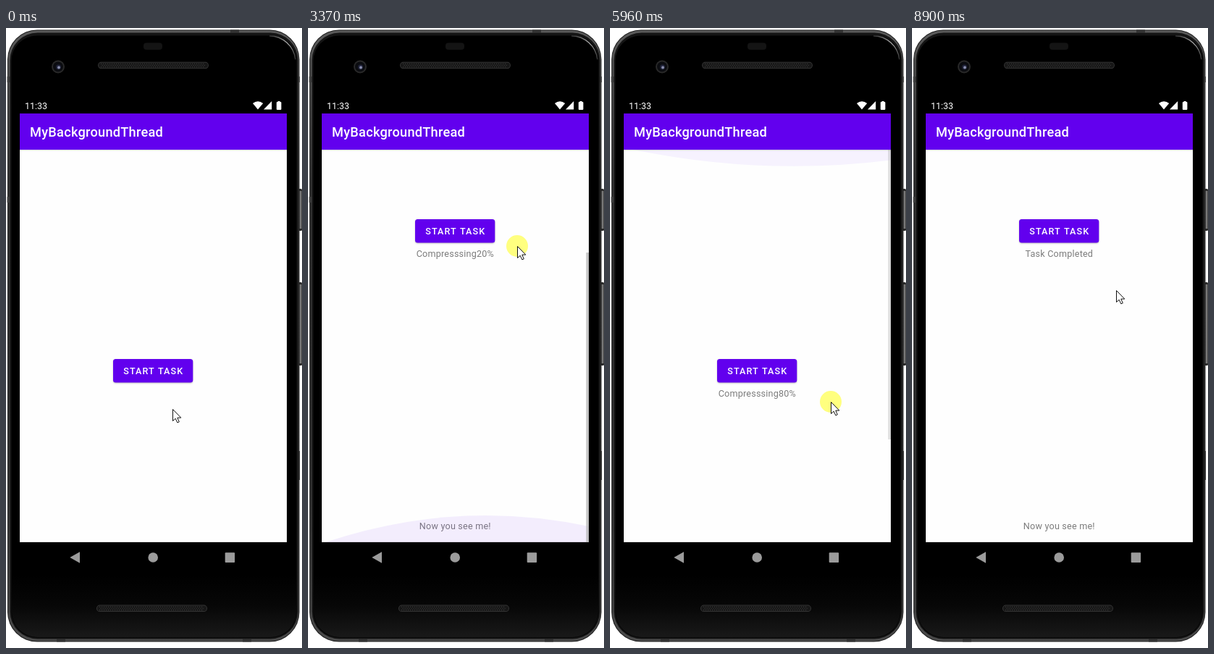
Animation of 409x856 px, one loop 9.07 s. Source, as an HTML page with a canvas:

```html
<!DOCTYPE html>
<html lang="en">
<head>
<meta charset="utf-8">
<title>Background task</title>
<style>
html, body { margin: 0; width: 100%; height: 100%; overflow: hidden; background: #fff; }
canvas { display: block; width: 409px; height: 856px; }
</style>
</head>
<body>
<canvas id="stage"></canvas>
<script>
const W = 409, H = 856, LOOP = 9070;
const STEP = 77, PHASE = 48;
const FONT = 'Roboto, "Noto Sans", sans-serif';
const PURPLE = '#6200ee', GREY = '#7c7c7c';
const SCREEN = { x: 19, y: 168, w: 369, h: 542, bottom: 710 };
const MID = 203.2;
const MAX_SCROLL = 193, SLOP = 32;
const CLICK = 1280, PRESS = 2290, RELEASE = 7290;

// Pointer: rest position, then moves as start, end, x, y
const REST = { x: 230, y: 526 };
const MOVES = [
  [430, 1140, 192, 476],
  [1425, 2060, 265, 597],
  [2366, 3216, 289, 301],
  [4570, 5490, 305, 494],
  [5560, 5900, 305, 516],
  [5960, 6780, 294, 258],
  [8130, 8640, 283, 371],
  [8640, 8820, 282, 362]
];

const dpr = window.devicePixelRatio || 1;
const clamp = (v, lo = 0, hi = 1) => Math.min(hi, Math.max(lo, v));
const easeOut = u => 1 - (1 - u) ** 2;
const snap = t => Math.max(0, PHASE + Math.floor((t - PHASE) / STEP) * STEP);

function prepare(canvas) {
  canvas.width = W * dpr;
  canvas.height = H * dpr;
  const c = canvas.getContext('2d');
  c.scale(dpr, dpr);
  return c;
}

const stage = prepare(document.getElementById('stage'));
const phone = document.createElement('canvas');
let g = prepare(phone);

// Follows the pointer; while it is held, dragging scrolls the page
// and whatever exceeds the limits becomes the edge glow.
function simulate(t) {
  let { x, y } = REST, scroll = -SLOP, scrolledAt = -LOOP, glow = 0;
  for (const [start, end, toX, toY] of MOVES) {
    if (t < start) break;
    const u = clamp((t - start) / (end - start));
    const fromY = y;
    x += (toX - x) * easeOut(u);
    y += (toY - y) * u;
    if (start < PRESS || start > RELEASE) continue;

    const wanted = scroll + fromY - y;
    const next = clamp(wanted, 0, MAX_SCROLL);
    if (next !== scroll) {
      const limit = Math.abs((next - scroll) / (toY - fromY));
      scrolledAt = start + Math.min(u, limit) * (end - start);
    }
    const over = wanted < 0 && scroll < 0 ? 0 : wanted - next;
    const pull = 44 * (1 - Math.exp(-Math.abs(over) / 30));
    const decay = clamp(1 - (t - end) / 2000, 0, 1);
    const recede = clamp(1 - (t - RELEASE) / 540);
    glow = Math.sign(over) * pull * decay * recede;
    scroll = next;
  }
  return {
    x, y, glow,
    scroll: Math.max(0, scroll),
    bar: clamp(1 - (t - scrolledAt - 300) / 200),
    pressed: (t >= CLICK && t < CLICK + 150) || (t >= PRESS && t < RELEASE)
  };
}

function message(t) {
  if (t < 1430) return '';
  if (t < 2360) return 'Task Started...';
  const percent = 10 + 10 * Math.floor((t - 2360) / 500);
  return percent > 100 ? 'Task Completed' : `Compresssing${percent}%`;
}

function rect(x, y, w, h, color) {
  g.fillStyle = color;
  g.fillRect(x, y, w, h);
}

function round(x, y, w, h, r, color) {
  g.beginPath();
  g.roundRect(x, y, w, h, r);
  g.fillStyle = color;
  g.fill();
}

function disc(x, y, r, color) {
  g.beginPath();
  g.arc(x, y, r, 0, Math.PI * 2);
  g.fillStyle = color;
  g.fill();
}

function poly(points, color) {
  g.beginPath();
  points.forEach(([x, y]) => g.lineTo(x, y));
  g.closePath();
  g.fillStyle = color;
  g.fill();
}

function ramp(x0, y0, x1, y1, ...colors) {
  const r = g.createLinearGradient(x0, y0, x1, y1);
  colors.forEach((color, i) => r.addColorStop(i / (colors.length - 1), color));
  return r;
}

function label(text, x, y, size, weight, color, spacing, align = 'left') {
  g.font = `${weight} ${size}px ${FONT}`;
  g.letterSpacing = spacing + 'px';
  g.textAlign = align;
  g.fillStyle = color;
  g.fillText(text, align === 'center' ? x + spacing / 2 : x, y);
}

function speaker(x, y) {
  round(x, y, 153, 9.5, 4.7, '#333');
  round(x + 1, y + 1, 151, 7.5, 3.7, '#171717');
  for (let row = 0; row < 3; row++)
    for (let i = 0; i < 48; i++)
      rect(x + 4 + i * 3 + (row % 2) * 1.5, y + 2 + row * 2.2, 1.2, 1.1, '#3b3b3b');
}

function sideButton(y, h) {
  round(404, y, 5, h, 1.5, '#2b2b2b');
  rect(405, y + 3, 3.5, h - 6, ramp(405, 0, 409, 0, '#4a4a4a', '#858585', '#5c5c5c'));
}

function drawBody() {
  sideButton(222, 58);
  sideButton(351, 115);
  rect(404, 584, 2, 40, '#333');
  round(2, 2.5, 403.5, 845, 41, '#1d1d1d');
  round(3, 3.5, 401.5, 843, 40, ramp(0, 3, 0, 847, '#5a5a5a', '#333', '#303030', '#333', '#4a4a4a'));
  // antenna breaks
  for (const y of [67, 233]) rect(1.5, y, 6, 8, '#3c3c3c');
  rect(401, 67, 5, 8, '#3c3c3c');
  for (const [x, y] of [[310, 2.5], [70, 843.5], [327, 843.5]]) rect(x, y, 12, 4, '#333');
  round(5.5, 6.5, 398, 837, 38, '#141414');
  round(7.5, 10.5, 394, 831, 35, '#000');
  round(8, 755, 393, 86, [0, 0, 35, 35], ramp(0, 755, 0, 841, '#000', '#070707', '#191919'));

  // light along the upper right corner
  g.beginPath();
  g.arc(364, 47, 36, -Math.PI / 2, -.1);
  g.strokeStyle = ramp(364, 11, 400, 44, '#333', '#aaa', '#333');
  g.lineWidth = 1.3;
  g.stroke();

  round(190, 20.5, 26, 9.5, 4, '#141414');
  speaker(127, 46.8);
  speaker(125, 796.6);
  disc(72, 53.5, 9, '#292929');
  disc(72, 53.5, 7, '#0b0c10');
  disc(72.5, 54, 3.4, '#20233a');
  disc(73, 54.5, 1.9, '#8a8fae');
}

function drawSystemBars() {
  rect(19, 95, 369, 660, '#000');
  label('11:33', 26, 112, 12.5, 400, '#fff', 0);

  g.beginPath();
  g.moveTo(348, 112.5);
  g.lineTo(341, 104);
  g.quadraticCurveTo(348, 98.5, 355.2, 104);
  g.fillStyle = '#fff';
  g.fill();
  poly([[356, 112.5], [367.2, 101], [367.2, 112.5]], '#fff');
  round(373.8, 102, 6.6, 11, 1, '#fff');
  rect(375.6, 101, 3, 1.5, '#fff');

  poly([[88.3, 731], [102, 723.3], [102, 738.8]], '#9b9b9b');
  disc(MID, 731, 6.8, '#9b9b9b');
  round(302.7, 724.3, 13.4, 13.6, 1, '#9b9b9b');
}

function drawAppBar() {
  rect(19, 168, 369, 2, ramp(0, 168, 0, 170, 'rgba(0,0,0,.16)', 'rgba(0,0,0,0)'));
  rect(19, 118, 369, 50, PURPLE);
  label('MyBackgroundThread', 33, 150, 18.2, 500, '#fff', .26);
}

function drawButton(y, t) {
  const box = [148, y, 110.3, 32.6, 3.6];
  g.save();
  g.shadowColor = 'rgba(0,0,0,.25)';
  g.shadowBlur = 2 * dpr;
  g.shadowOffsetY = dpr;
  round(...box, PURPLE);
  g.restore();

  const age = t - CLICK;
  if (age >= 0 && age < 440) {
    g.save();
    g.beginPath();
    g.roundRect(...box);
    g.clip();
    disc(192, 473, 14 + age * .45, `rgba(255,255,255,${.3 * (1 - age / 440)})`);
    g.restore();
  }
  label('START TASK', MID, y + 21, 12.57, 500, '#fff', 1.12, 'center');
}

function drawGlow(size, tipX) {
  const h = Math.abs(size);
  if (h < .5) return;
  const edge = size > 0 ? SCREEN.bottom : SCREEN.y;
  const cx = (tipX + MID) / 2, half = 222;
  g.beginPath();
  g.moveTo(cx - half, edge);
  g.quadraticCurveTo(cx, edge - size * 2, cx + half, edge);
  g.fillStyle = `rgba(98,0,238,${.012 + h * .0015})`;
  g.fill();
}

function drawCursor({ x, y, pressed }) {
  if (pressed) disc(x, y, 15, 'rgba(255,255,0,.5)');
  const shape = [[0, 0], [0, 16], [3.7, 12.7], [6.3, 18.3], [8.8, 17.3], [6.3, 11.6], [11.3, 11.6]];
  poly(shape.map(([a, b]) => [Math.round(x) + .5 + a, Math.round(y) + .5 + b]), '#fff');
  g.strokeStyle = '#111';
  g.lineWidth = 1;
  g.stroke();
}

function draw(t) {
  const state = simulate(t);
  const { scroll } = state;
  const { x, y, w, h, bottom } = SCREEN;

  g.drawImage(phone, 0, 0, W, H);
  g.save();
  g.beginPath();
  g.rect(x, y, w, h);
  g.clip();
  rect(x, y, w, h, '#fefefe');
  drawButton(457 - scroll, t);
  label(message(t), MID, 509 - scroll, 12.57, 400, GREY, .22, 'center');
  label('Now you see me!', MID, 884.5 - scroll, 12.57, 400, GREY, .22, 'center');
  drawGlow(state.glow, state.x);
  rect(x, bottom - 1, w, 1, 'rgba(0,0,0,.12)');
  if (state.bar > 0) rect(384.4, y + scroll * .736, 3.6, 400, `rgba(178,178,178,${state.bar})`);
  g.restore();

  drawAppBar();
  drawCursor(state);
}

rect(0, 0, W, H, '#fff');
drawBody();
drawSystemBars();
g = stage;

const begin = performance.now();
function tick() {
  draw(snap((performance.now() - begin) % LOOP));
  requestAnimationFrame(tick);
}
tick();
</script>
</body>
</html>
```
